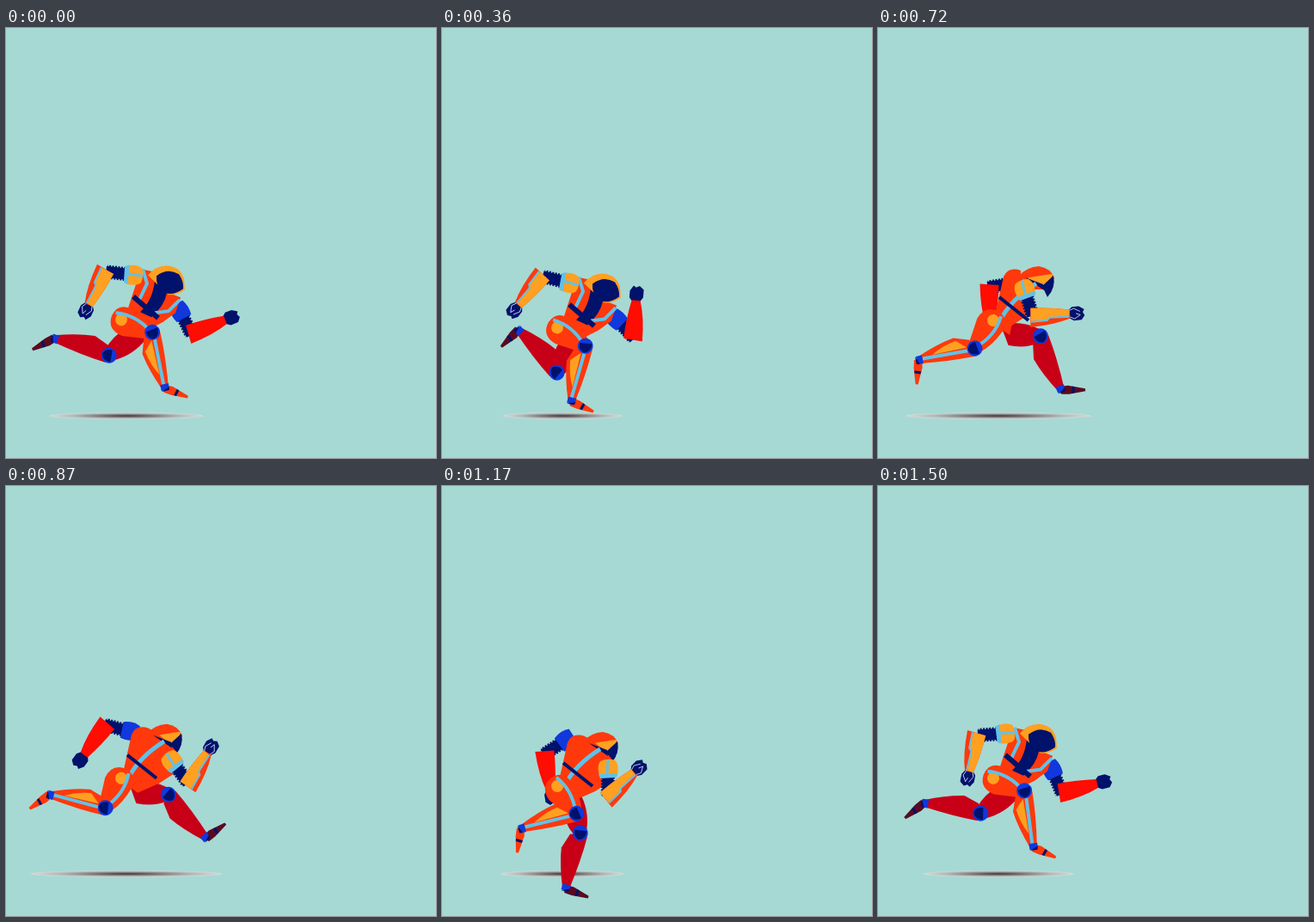
Animation of 500x500 px, one loop 1.53 s. Source, as an HTML page with a canvas:

```html
<!DOCTYPE html>
<html>
<head>
<meta charset="utf-8">
<style>
html, body { margin: 0; height: 100%; overflow: hidden; background: #a6d9d4; }
canvas { display: block; }
</style>
</head>
<body>
<canvas id="stage" width="500" height="500"></canvas>
<script>
const ctx = document.getElementById('stage').getContext('2d');
const LOOP = 1530, STEP = 30;
const ORANGE = '#ff390c', RED = '#ff0c02', CRIMSON = '#c80017', MAROON = '#5a0a20',
  YELLOW = '#ffa021', SKY = '#62c1e6', NAVY = '#00126b', BLUE = '#1038dc';

// Key poses: time, then thigh, shin and foot angles of the near and the far leg.
const strides = [
  [0, 22, 77, 20, 141, 197, 152], [120, 6, 46, -25, 138, 214, 150],
  [360, 33, 104, 23, 115, 228, 134], [570, 111, 133, 28, 18, 145, 90],
  [790, 124, 184, 125, 0, 40, -40], [870, 118, 193, 144, 3, 49, -38],
  [1080, 86, 206, 143, 24, 84, 10], [1290, 17, 101, 33, 141, 135, 38]];
// Arm swing shared by both arms: phase, upper arm and forearm angles.
const swing = [
  [0, 187, 115], [375, 192, 126], [570, 114, 46], [745, 68, -14],
  [870, 54, -60], [1080, 54, -81], [1290, 146, 22], [1500, 176, 101]];

// Smooth periodic interpolation through the rows.
function sample(rows, time) {
  const n = rows.length, t = (time + LOOP) % LOOP;
  const row = i => {
    const turn = Math.floor(i / n), r = rows[i - turn * n];
    return [r[0] + turn * LOOP, ...r.slice(1)];
  };
  let i = n - 1;
  while (rows[i][0] > t) i--;
  const [p, a, b, q] = [row(i - 1), row(i), row(i + 1), row(i + 2)];
  const d = b[0] - a[0], u = (t - a[0]) / d;
  return a.slice(1).map((v, k) => {
    k++;
    const ma = (b[k] - p[k]) / (b[0] - p[0]) * d, mb = (q[k] - v) / (q[0] - a[0]) * d;
    const c = 3 * (b[k] - v) - 2 * ma - mb, e = 2 * (v - b[k]) + ma + mb;
    return v + u * (ma + u * (c + u * e));
  });
}

const wave = (t, n = 1) => Math.cos(2 * Math.PI * n * t / LOOP);
const mix = (a, b, u) => a + (b - a) * u;
const smooth = (a, b, t) => {
  const u = Math.min(1, Math.max(0, (t - a) / (b - a)));
  return u * u * (3 - 2 * u);
};
const step = ([x, y], deg, len) =>
  [x + len * Math.cos(deg * Math.PI / 180), y + len * Math.sin(deg * Math.PI / 180)];

const fill = (d, color) => { ctx.fillStyle = color; ctx.fill(new Path2D(d)); };
const line = (d, color, width) => {
  ctx.strokeStyle = color;
  ctx.lineWidth = width;
  ctx.stroke(new Path2D(d));
};
const dot = (x, y, r, color) => {
  ctx.fillStyle = color;
  ctx.beginPath();
  ctx.arc(x, y, r, 0, 7);
  ctx.fill();
};

function at([x, y], deg, draw) {
  ctx.save();
  ctx.translate(x, y);
  ctx.rotate(deg * Math.PI / 180);
  draw();
  ctx.restore();
}

function shadow(half) {
  ctx.save();
  ctx.translate(140, 451);
  ctx.scale(half, 4);
  const g = ctx.createRadialGradient(0, 0, 0, 0, 0, 1);
  g.addColorStop(0, '#3c3336');
  g.addColorStop(.35, '#7b7878');
  g.addColorStop(.7, '#b3b9b8');
  g.addColorStop(1, '#d3dcda');
  dot(0, 0, 1, g);
  ctx.restore();
}

function leg(hip, [thigh, shin, foot], near) {
  const knee = step(hip, thigh, 39), ankle = step(knee, shin, 67);
  at(ankle, foot, () => {
    fill('M-3 -4L8 -5L28 -1L28 2L9 5L0 5Z', near ? ORANGE : MAROON);
    fill('M13 -4L16 -3L15 4L12 4Z', NAVY);
  });
  at(hip, thigh, () => {
    if (near) {
      fill('M-12 0Q-11 -17 6 -16Q26 -15 38 -8L38 9L8 17Q-11 17 -12 0', ORANGE);
      dot(0, 0, 7, YELLOW);
      line('M-9 -5Q14 -12 37 0', SKY, 4);
    } else {
      fill('M-8 -12Q16 -18 38 -8L38 8Q22 15 2 12Z', CRIMSON);
    }
  });
  at(knee, shin, () => {
    fill('M2 -9Q30 -9 66 -4L67 4Q42 14 22 17L4 11Z', near ? ORANGE : CRIMSON);
    if (near) {
      fill('M9 3L20 13Q36 11 50 3Z', YELLOW);
      line('M4 -1L62 1', SKY, 4);
    }
    fill('M62 -5L69 -4L69 5L62 5Z', BLUE);
    fill('M66 -5L70 -4L70 5Z', NAVY);
    dot(0, 0, 9, BLUE);
    fill('M-4 -7Q6 -8 8 0Q6 7 -2 7Z', NAVY);
  });
}

function arm(shoulder, [upper, fore], near) {
  const elbow = step(shoulder, upper, near ? 34 : 30);
  at(shoulder, upper, () => {
    line('M4 0H32', NAVY, 13);
    ctx.setLineDash([2, 1.5]);
    line('M6 0H31', NAVY, 16);
    ctx.setLineDash([]);
    if (near) {
      fill('M-10 -8Q-6 -13 8 -11L10 9Q-2 14 -9 9Q-13 0 -10 -8', YELLOW);
      fill('M5 -11L10 -10L11 9L6 11Z', SKY);
      line('M-11 0L7 1', SKY, 3);
    } else {
      fill('M-9 -8Q0 -12 10 -10L11 9Q0 13 -9 9Z', BLUE);
    }
  });
  at(elbow, fore, () => {
    fill('M41 -4L46 -8L54 -8L60 -4L58 -1L60 3L56 8L47 8L41 4Z', NAVY);
    if (near) line('M42 -4L48 -6L55 -2M42 3L48 6L55 2L50 0', '#dfe6ff', .8);
    fill('M-2 -11Q20 -10 43 -5L43 5Q24 11 -4 11Z', near ? ORANGE : RED);
    if (near) {
      fill('M-2 -11Q20 -10 43 -5L42 2L18 2L16 5L-3 4Z', YELLOW);
      line('M-3 5L16 5L19 2L42 3', SKY, 2);
    }
  });
}

function torsoFront() {
  fill('M147 311L157 281L171 284L187 308L203 314L197 332L182 343L156 356L136 345Z', ORANGE);
  fill('M173 294L187 309Q184 324 169 337L156 331Q171 317 173 294', NAVY);
  line('M159 281L164 298L155 317M202 317L189 330L173 332', SKY, 4);
  line('M148 313L177 338', NAVY, 6);
  fill('M165 288Q174 277 187 277Q203 278 207 293L208 305Q199 312 189 311L174 297Z', YELLOW);
  fill('M175 289Q188 279 201 287Q207 296 206 304Q194 313 182 308Q174 300 175 289', NAVY);
}

// The chest edge follows the near shoulder at x.
function torsoBack(x) {
  fill('M164 288Q173 278 187 277Q201 279 205 291L196 304L180 304Z', ORANGE);
  fill('M173 291Q186 288 203 286L200 301L191 302Z', YELLOW);
  fill('M204 288Q207 302 197 313L191 300Z', NAVY);
  fill(`M146 289Q152 277 166 282Q${x - 6} 293 ${x + 11} 317L${x + 5} 333L${x - 15} 346
    L153 357L134 343Z`, ORANGE);
  fill('M171 290L192 298L193 305Z', NAVY);
  line('M184 297Q155 315 142 340', SKY, 5);
  line('M141 313L175 340', NAVY, 4);
}

function draw(t) {
  const twist = smooth(570, 870, t) * (1 - smooth(1200, 1480, t));
  const turn = 1 - (1 - twist) ** 2;
  const bob = 4 - 5 * wave(t - 35, 2);
  const shoulderX = mix(148, 193, twist);
  const legs = sample(strides, t);
  const farPhase = t + LOOP / 2 - 90 * wave(t - LOOP / 4);

  ctx.fillStyle = '#a6d9d4';
  ctx.fillRect(0, 0, 500, 500);
  shadow(86 - 11.5 * wave(t - 50) + 16 * wave(t - 50, 2));
  ctx.save();
  ctx.translate(0, bob);
  arm([mix(202, 145, turn), mix(329, 286, turn)], sample(swing, farPhase), false);
  leg([150, 357], legs.slice(3), false);
  twist < .5 ? torsoFront() : torsoBack(shoulderX);
  leg([134, 340], legs.slice(0, 3), true);
  arm([shoulderX, mix(288, 320, twist)], sample(swing, t), true);
  ctx.restore();
}

function tick() {
  draw(Math.floor(performance.now() % LOOP / STEP) * STEP);
  requestAnimationFrame(tick);
}
tick();
</script>
</body>
</html>
```
